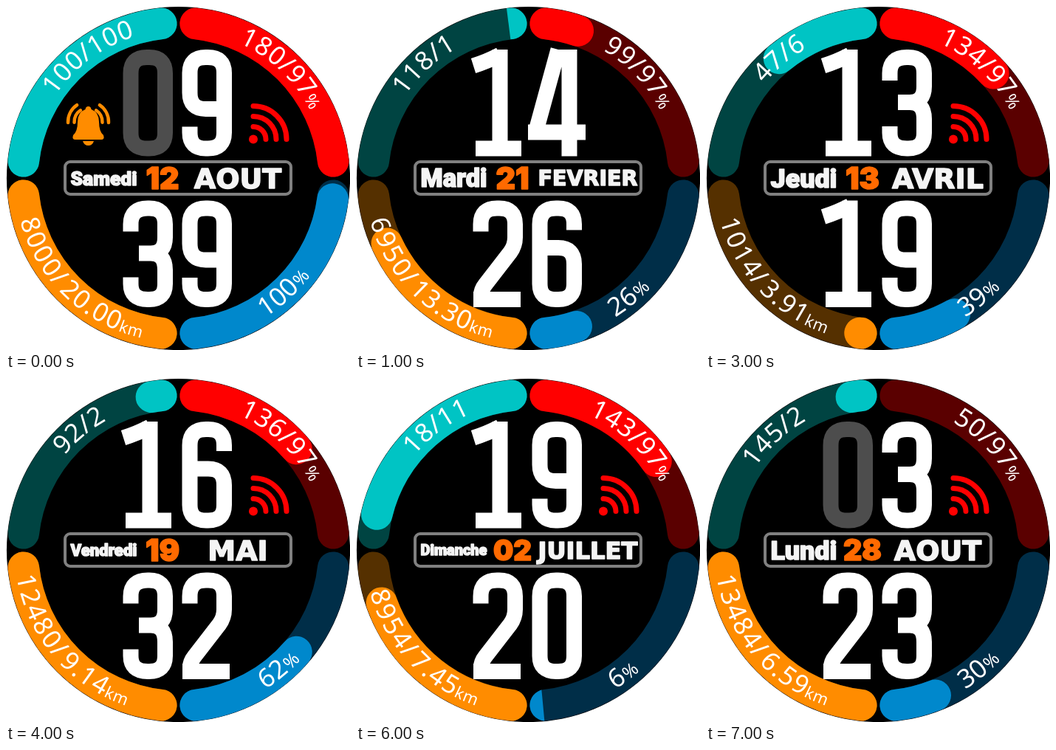
Animation of 466x466 px, one loop 8 s. Source, as an HTML page with a canvas:

```html
<!DOCTYPE html>
<html lang="fr">
<head>
<meta charset="utf-8">
<style>
  html, body { margin: 0; width: 100%; height: 100%; overflow: hidden; background: #fff; }
  canvas { display: block; }
</style>
</head>
<body>
<canvas id="face" width="466" height="466"></canvas>
<script>
const ctx = document.getElementById('face').getContext('2d');
const RAD = Math.PI / 180, CENTER = 233.5, RADIUS = 211, FIRST = 6.3, LAST = 83.7;
const ORANGE = '#ff8c00', RED = '#ff0000';

// One face per second; stepAngle is how far the step ring is filled, in degrees.
const keys = ['hour', 'minute', 'day', 'date', 'month', 'calories', 'floors', 'pulse',
  'battery', 'steps', 'km', 'stepAngle', 'bell', 'signal'];
const faces = [
  ['09', '39', 'Samedi', '12', 'AOUT', 100, 100, 180, 100, 8000, '20.00', 90, 1, 1],
  ['14', '26', 'Mardi', '21', 'FEVRIER', 118, 1, 99, 26, 6950, '13.30', 65.3, 0, 0],
  ['10', '45', 'Mercredi', '15', 'MARS', 126, 2, 88, 54, 3521, '5.62', 35, 0, 1],
  ['13', '19', 'Jeudi', '13', 'AVRIL', 47, 6, 134, 39, 1014, '3.91', 6.3, 0, 1],
  ['16', '32', 'Vendredi', '19', 'MAI', 92, 2, 136, 62, 12480, '9.14', 90, 0, 1],
  ['03', '05', 'Samedi', '24', 'JUIN', 75, 1, 156, 6, 10010, '10.87', 90, 1, 1],
  ['19', '20', 'Dimanche', '02', 'JUILLET', 18, 11, 143, 6, 8954, '7.45', 70.3, 0, 1],
  ['03', '23', 'Lundi', '28', 'AOUT', 145, 2, 50, 30, 13484, '6.59', 90, 0, 1],
].map(row => Object.fromEntries(row.map((value, i) => [keys[i], value])));

const six = 'M57.5 40V32Q57.5 10.5 36 10.5H33Q11 10.5 11 32V113Q11 134 33 134H36Q57.5 134 57.5 113V86Q57.5 64 36 64H12';
const digits = {
  0: 'M11 32Q11 10.5 33 10.5H36Q57.5 10.5 57.5 32V113Q57.5 134 36 134H33Q11 134 11 113Z',
  1: 'M1 22Q20 16 37 7M37 0V144.5M4 134H66',
  2: 'M11 42V32Q11 10.5 33 10.5H36Q57.5 10.5 57.5 32V50Q57.5 61 51 70L17 114Q11.5 121 11.5 128V134M1 134H65',
  3: 'M11 42V32Q11 10.5 34 10.5H36Q57.5 10.5 57.5 32V50Q57.5 71.5 38 71.5H22M38 71.5Q57.5 71.5 57.5 94V113Q57.5 134 36 134H34Q11 134 11 113V104',
  4: 'M36 0L7 106M25 10.5H60M-5 112H73M51 0V144.5',
  5: 'M63 10.5H12.5V80M12.5 76Q16 58 35 58H36Q57.5 58 57.5 80V113Q57.5 134 36 134H33Q11 134 11 113V104',
  6: six,
  9: six,
};
for (const d in digits) digits[d] = new Path2D(digits[d]);

const bellBody = new Path2D('M111.5 136Q115 136 115.5 140Q126 144 126 157Q126 170 132 175Q134 181 129 181H94Q89 181 91 175Q97 170 97 157Q97 144 107.5 140Q108 136 111.5 136ZM104 183H119Q117 189 111.5 189Q106 189 104 183Z');

function isolated(draw) {
  ctx.save();
  draw();
  ctx.restore();
}

function strokeArc(x, y, r, from, to) {
  ctx.beginPath();
  ctx.arc(x, y, r, from * RAD, to * RAD);
  ctx.stroke();
}

// A quarter ring measured from the vertical axis, mirrored into its quadrant.
function ring(sx, sy, bright, dim, level, cut) {
  isolated(() => {
    ctx.translate(CENTER, CENTER);
    ctx.scale(sx, sy);
    ctx.lineWidth = 42.5;
    ctx.lineCap = 'round';
    ctx.strokeStyle = dim;
    strokeArc(0, 0, RADIUS, FIRST - 90, LAST - 90);
    if (level < 0) return;
    if (level < FIRST) {
      ctx.beginPath();
      ctx.moveTo(0, 0);
      ctx.arc(0, 0, 240, -100 * RAD, (cut - 90) * RAD);
      ctx.clip();
    }
    ctx.strokeStyle = bright;
    const end = Math.min(LAST, Math.max(level, FIRST + .5));
    strokeArc(0, 0, RADIUS, FIRST - 90, end - 90);
  });
}

// Text along the ring: side 1 runs over the top, side -1 along the bottom. Returns the end angle.
function arcText(text, angle, side, { size = 35, gap = .2, alignEnd = false } = {}) {
  const r = side > 0 ? 201 : 222;
  ctx.font = `500 ${size}px "Noto Sans", "Open Sans", sans-serif`;
  ctx.textAlign = 'center';
  ctx.fillStyle = '#fff';
  const widths = [...text].map(c => ctx.measureText(c).width / r / RAD + gap);
  if (alignEnd) angle -= widths.reduce((sum, w) => sum + w, 0);
  [...text].forEach((c, i) => {
    isolated(() => {
      ctx.translate(CENTER, CENTER);
      ctx.rotate(side * (angle + widths[i] / 2) * RAD);
      ctx.fillText(c, 0, -side * r);
    });
    angle += widths[i];
  });
  return angle;
}

function bigNumber(text, y) {
  [...text].forEach((d, i) => isolated(() => {
    ctx.translate(i ? 238 : 158, y);
    if (d === '9') {
      ctx.translate(68.5, 144.5);
      ctx.rotate(Math.PI);
    }
    ctx.lineWidth = 21;
    ctx.strokeStyle = !i && d === '0' ? '#4d4d4d' : '#fff';
    ctx.stroke(digits[d]);
  }));
}

// Centred word, as large as its column allows.
function label(text, x, room, font, maxSize, color) {
  const setSize = size => ctx.font = font.replace('SIZE', size + 'px');
  setSize(100);
  const size = Math.min(maxSize, room / ctx.measureText(text).width * 100);
  setSize(size);
  ctx.textAlign = 'center';
  ctx.fillStyle = ctx.strokeStyle = color;
  ctx.lineWidth = 1.6;
  ctx.lineJoin = 'round';
  ctx.fillText(text, x, 233 + size * .36);
  ctx.strokeText(text, x, 233 + size * .36);
}

function dateBox({ day, date, month }) {
  ctx.beginPath();
  ctx.roundRect(80, 211, 306, 44, 7);
  ctx.fillStyle = '#000';
  ctx.fill();
  ctx.lineWidth = 4;
  ctx.strokeStyle = '#808080';
  ctx.stroke();
  label(day, 132.5, 90, '900 condensed SIZE Roboto, sans-serif', 36, '#f4f4f4');
  label(date, 212, 52, '900 SIZE Inter, sans-serif', 41, '#ff6a00');
  label(month, 314, 135, 'bold SIZE "DejaVu Sans", sans-serif', 38, '#f4f4f4');
}

function bell() {
  ctx.fillStyle = ctx.strokeStyle = ORANGE;
  ctx.fill(bellBody);
  ctx.lineWidth = 4.5;
  for (const r of [19, 27.5]) {
    strokeArc(111.5, 157, r, 178, 236);
    strokeArc(111.5, 157, r, 304, 362);
  }
}

function signal() {
  ctx.fillStyle = ctx.strokeStyle = RED;
  ctx.beginPath();
  ctx.arc(335, 180.5, 6, 0, 7);
  ctx.fill();
  ctx.lineWidth = 7;
  for (const r of [17, 31, 45]) strokeArc(335, 180.5, r, -90, 0);
}

function drawFace(f) {
  ctx.clearRect(0, 0, 466, 466);
  ctx.fillStyle = '#000';
  ctx.beginPath();
  ctx.arc(CENTER, CENTER, 232.6, 0, 7);
  ctx.fill();

  ring(-1, 1, '#00c4c4', '#004442', 2.6 + 7.4 * (f.floors - 1), 7.3);
  ring(1, 1, RED, '#5a0000', 18.6 + .83 * (f.pulse - 99), FIRST);
  ring(-1, -1, ORANGE, '#553000', f.stepAngle, FIRST);
  ring(1, -1, '#0088cc', '#002e48', 18 + .87 * (f.battery - 26), 5.4);

  arcText(`${f.calories}`, -38.6, 1, { alignEnd: true });
  arcText(`/${f.floors}`, -38.6, 1);
  arcText(`${f.pulse}`, 41.7, 1, { alignEnd: true });
  arcText('/97', 41.7, 1);
  arcText('%', 57.3, 1, { size: 23 });
  arcText(`${f.steps}`, -52, -1, { gap: .7, alignEnd: true });
  arcText('/', -52, -1);
  const kmEnd = arcText(f.km, -47.1, -1, { gap: .45 });
  arcText('km', kmEnd, -1, { size: 22 });
  const batteryEnd = arcText(`${f.battery}`, 31.9, -1);
  arcText('%', batteryEnd + .3, -1, { size: 24 });

  bigNumber(f.hour, 59);
  bigNumber(f.minute, 263.5);
  dateBox(f);
  isolated(() => {
    ctx.lineCap = 'round';
    if (f.bell) bell();
    if (f.signal) signal();
  });
}

const start = performance.now();
function tick() {
  const elapsed = Math.max(0, performance.now() - start);
  drawFace(faces[Math.floor(elapsed / 1000) % faces.length]);
  requestAnimationFrame(tick);
}
tick();
</script>
</body>
</html>
```
